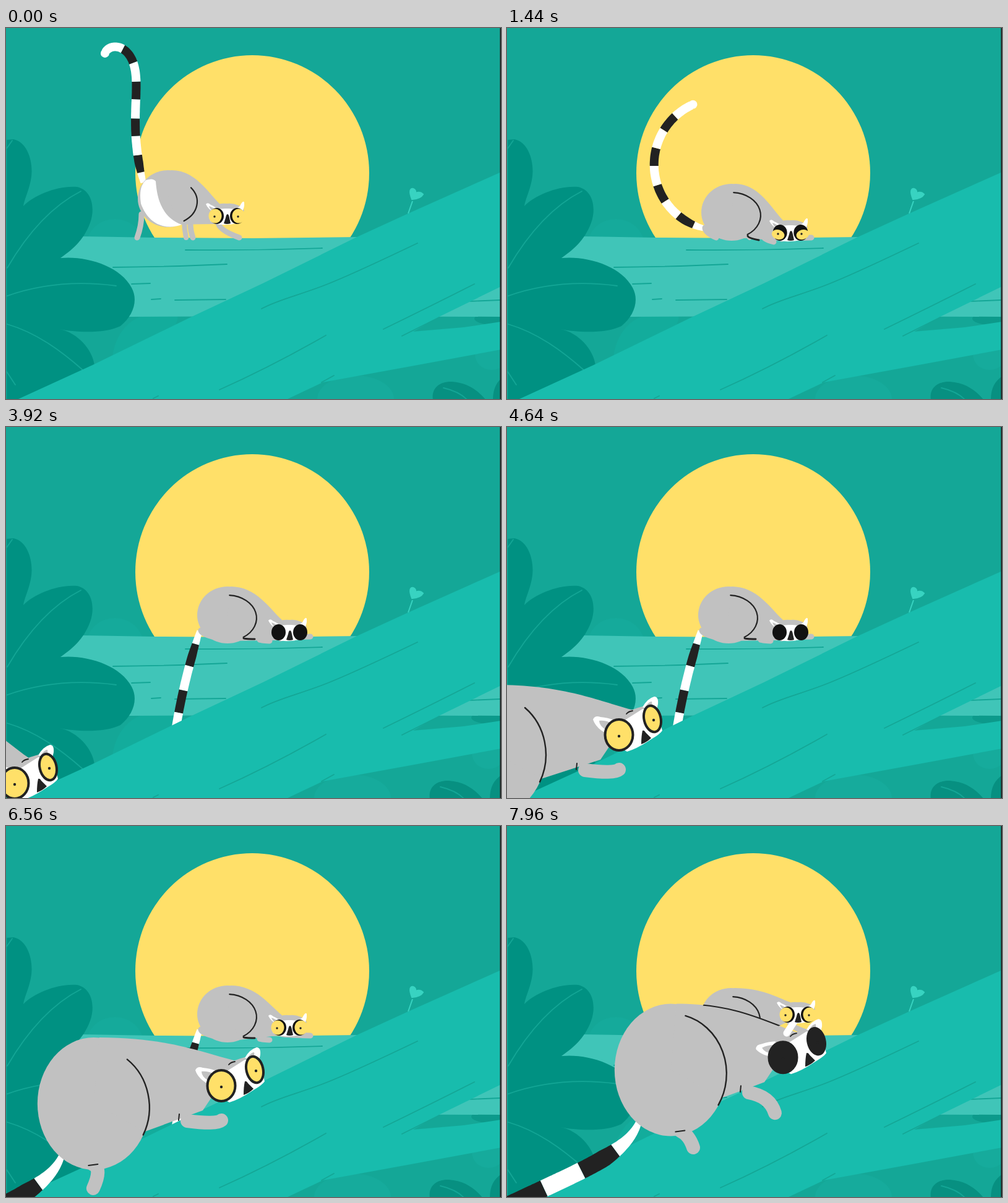
Write an HTML page that moves like this. It is 800 by 600 pixels and loops after 8 s.

```html
<!DOCTYPE html>
<html lang="en">
<head>
<meta charset="utf-8">
<title>Lemurs at sunset</title>
<style>
html, body { margin: 0; width: 100%; height: 100%; overflow: hidden; background: #14a797; }
svg { display: block; width: 100vw; height: 100vh; }
.line { fill: none; stroke: #14a696; stroke-width: 1.8; stroke-linecap: round; }
</style>
</head>
<body>
<svg viewBox="0 0 800 600" preserveAspectRatio="none">
  <rect width="800" height="600" fill="#14a797"/>
  <ellipse cx="176" cy="352" rx="46" ry="43" fill="#15aa9b"/>
  <path d="M172 530C178 492 202 466 232 464H278C276 484 268 496 250 510Z" fill="#13ac9c"/>
  <g id="brush">
    <ellipse cx="560" cy="600" rx="62" ry="38" fill="#16ab9c"/>
    <ellipse cx="780" cy="528" rx="27" ry="25" fill="#16ab9c"/>
    <ellipse cx="782" cy="470" rx="30" ry="10" fill="#0c9a8b"/>
    <path d="M685 602C682 582 696 571 716 572C740 574 756 584 771 602ZM782 602C782 580 790 568 806 560V602Z" fill="#079081"/>
    <path class="line" d="M702 582Q728 588 741 602"/>
  </g>
  <ellipse cx="398" cy="234.5" rx="189" ry="190.5" fill="#ffe069"/>
  <path d="M0 340L122 337L240 339L400 340L570 338L800 350V467L500 466L200 467H0Z" fill="#40c5b8"/>
  <path class="line" d="M290 359Q400 360 511 356M173 387Q270 386 357 382M203 414L233 413M235 439L250 438M273 440L355 439M750 442L798 440"/>
  <g id="far"></g>
  <path d="M650 300L657 280M656 277C651 264 653 259 658 260Q663 262 662 267Q669 264 674 269Q670 276 657 277Z" fill="#38d3c1" stroke="#38d3c1" stroke-width="2"/>
  <path d="M0 181L12 180C34 184 44 215 41 240C38 262 30 275 28 288C45 270 85 254 115 257C138 262 145 290 136 315C125 345 105 360 88 372C130 368 185 385 203 420C214 440 206 465 185 482C160 495 110 492 86 487C115 492 140 520 143 546L40 600H0Z" fill="#009182"/>
  <path class="line" d="M1 195L10 182M2 388C30 340 70 290 121 264M0 434C50 416 110 408 178 417M2 479C50 493 90 523 124 553M0 554L15 577M.5 180V600"/>
  <path d="M20 600L140 545L300 467L415 413L565 339L650 300L800 233V418L700 467L658 491L740 484L800 475V520L660 546L512 573L455 600Z" fill="#18bcad"/>
  <path class="line" d="M413 454C440 439 475 432 520 414S610 374 665 348M610 487Q690 448 757 414M640 498L700 468M345 585Q430 547 517 497M510 573L530 562M238 599L246 595"/>
  <g id="near"></g>
  <g id="top"></g>
  <rect x="798.3" width="2" height="600" fill="#222"/>
</svg>
<script>
const GREY = '#c1c1c1', INK = '#222', SUN = '#ffe069', WHITE = '#fff';
const RAD = Math.PI / 180;
const el = id => document.getElementById(id);
const clamp = k => Math.max(0, Math.min(1, k));
const add = (p, dx, dy) => [p[0] + dx, p[1] + dy];
const xy = p => p[0].toFixed(1) + ' ' + p[1].toFixed(1);

// Eased 0..1 ramp between two moments.
function ease(t, from, to) {
  const k = clamp((t - from) / (to - from));
  return k * k * (3 - 2 * k);
}

// ---- Drawing helpers ----
const fill = (d, c) => `<path d="${d}" fill="${c}"/>`;
const stroke = (d, c, w, more = '') =>
  `<path d="${d}" fill="none" stroke="${c}" stroke-width="${w}" stroke-linecap="round" stroke-linejoin="round" ${more}/>`;
const oval = (x, y, rx, ry, c, more = '') =>
  `<ellipse cx="${x}" cy="${y}" rx="${rx}" ry="${ry}" fill="${c}" ${more}/>`;
const place = (p, s) => `<g transform="translate(${xy(p)})">${s}</g>`;
const limb = (a, b, c, w) => stroke(`M${xy(a)}Q${xy(b)} ${xy(c)}`, GREY, w);
const onOval = ([x, y], rx, ry, deg) => [x + rx * Math.cos(deg * RAD), y + ry * Math.sin(deg * RAD)];
const arc = (p, rx, ry, from, to) =>
  `M${xy(onOval(p, rx, ry, from))}A${rx} ${ry} 0 0 1 ${xy(onOval(p, rx, ry, to))}`;

// Round rump with a back line to the neck and a belly line to the chest.
function torso(rump, rx, ry, neck, chest, bellyDeg) {
  const top = add(rump, rx * .1, -ry);
  const dx = neck[0] - top[0], dy = neck[1] - top[1];
  const back = `M${xy(top)}C${xy(add(top, dx / 2, 0))} ${xy(add(neck, -dx / 4, -dy * .35))} ${xy(neck)}`;
  const shape = oval(...rump, rx, ry, GREY) +
    fill(`${back}L${xy(chest)}L${xy(onOval(rump, rx, ry, bellyDeg))}L${xy(rump)}Z`, GREY);
  return { back, shape };
}

// Ringed tail that grows along a changing heading.
function tail([x, y], len, heading, bands, first, width) {
  const n = 90, left = [], right = [];
  for (let i = 0; i <= n; i++) {
    const a = heading(i / n) * RAD, w = width(i / n) / 2;
    const c = Math.cos(a), s = Math.sin(a);
    left.push([x - s * w, y + c * w]);
    right.push([x + s * w, y - c * w]);
    x += c * len / n;
    y += s * len / n;
  }
  const edge = i => i ? Math.round(n * (first + (1 - first) * (i - 1) / (bands - 1))) : 0;
  let out = oval(x, y, width(1) / 2, width(1) / 2, bands % 2 ? WHITE : INK);
  for (let i = 0; i < bands; i++) {
    const a = edge(i), b = edge(i + 1) + 1;
    const ring = left.slice(a, b).concat(right.slice(a, b).reverse());
    out += fill('M' + ring.map(xy).join('L') + 'Z', i % 2 ? INK : WHITE);
  }
  return out;
}

// ---- Small lemur: walks in, crouches, dozes, looks up ----
const GROUND = 339;

function farPose(t) {
  const low = ease(t, 1000, 1400), settle = ease(t, 1600, 2000);
  const wake = ease(t, 5800, 6300), rise = ease(t, 6900, 7700);
  const rump = [262 + 101 * clamp(t / 1300) - 5 * settle + 4 * rise, 276 + 22 * low + 6 * settle + 4 * rise];
  const head = add(rump, 95 + 5 * settle + 8 * rise, 28 + 5 * low - 5 * settle - 6 * wake - 25 * rise);
  const lid = .32 * (low - wake) + .68 * (ease(t, 2200, 2480) - ease(t, 4850, 5050));
  return { low, rise, rump, head, lid };
}

function farTail(t, { rump, low }) {
  const swing = ease(t, 1000, 1440), fall = ease(t, 1560, 2300);
  const start = -105 - 60 * swing - 87 * fall;
  const bend = 40 + 100 * swing - 158 * fall;
  const curl = -180 * (1 - ease(t, 0, 1000));
  return tail(add(rump, -40 - 5 * low, -26 + 52 * low), 255 + 5 * swing + 72 * fall,
    u => start + bend * u + curl * u ** 6, 9, .065, u => 9 + 5 * clamp(u * 8));
}

function drawFar(t) {
  const p = farPose(t), { rump, head, low } = p;
  const step = 8 * Math.sin(t / 1000 * 2 * Math.PI) * (1 - low);
  const leg = (hip, x, y, w) => limb(hip, [hip[0], (hip[1] + y) / 2], [x, y], w);
  const body = torso(rump, 49, 46, add(head, -12, -20), add(head, -19, 13), 65);
  const x = rump[0];
  el('far').innerHTML = farTail(t, p) +
    leg(add(rump, -43, 25), x - 50 + 25 * low + step, GROUND, 9) +
    leg(add(rump, 26, 35), x + 29 - step, GROUND, 8) +
    leg(add(rump, 36 + 16 * low, 40), x + 40 + 28 * low + step, GROUND + 7 * low, 9) +
    leg(add(head, -14, 10), head[0] + 20 + 14 * low - step, GROUND, 9) +
    `<clipPath id="farBody">${body.shape}</clipPath>` + body.shape +
    `<g transform="translate(${xy(add(rump, -46 * low, 0))}) scale(${1 - low})">` +
    fill('M-36-30Q-24-34-20-28C-18 0-10 30 22 42C0 50-30 46-44 8Q-48-20-36-30Z', WHITE) + '</g>' +
    stroke(arc(add(rump, 0, 5), 47, 37, -38 - 48 * low, 57), INK, 2.2) +
    leg(add(rump, 26, 38), x + 44, GROUND + 4 * low, 3).replace(GREY, low > .9 ? INK : 'none');
}

function smallHead(p, lid) {
  let s = fill('M-30-8Q-20-22 0-20Q18-22 28-9L22 5L-22 5Z', GREY) +
    fill('M-20-6Q-30-10-34-19Q-31-23-26-18Q-18-15-14-9Z M14-9Q17-14 21-16Q26-26 28-22Q29-12 23-5Z', WHITE) +
    fill('M-22-8Q-28-11-29-16Q-22-14-18-9Z', GREY) +
    fill('M-26-3Q-16-13 0-12Q14-13 25-5L25 6Q16 14 0 14Q-20 15-27 8Z', WHITE);
  for (const m of [-1, 1]) {
    const x = m * 19;
    s += oval(m * (16.5 + lid), 0, 11.5, 13, '#111') +
      oval(x, 10 * lid, 10.5, 11.5 * (1 - lid), SUN, `transform="rotate(${-m * 50 * lid} ${x} 0)"`);
    if (lid < .8) s += oval(x - 1, 1 + lid * 3, 1.7, 1.7, INK);
  }
  return place(p, s + fill('M1-3Q3-3 4 3L6 12Q0 14-5 12L-2 3Q-1-3 1-3Z', INK));
}

// ---- Big lemur: head reaches out, rump half follows, then catches up ----
const REACH = .61, PERIOD = 1650, FIRST = 2350;

function nearPose(t) {
  let head = -2, rump = -2, foot = -2;
  for (let i = 0; i < 4; i++) {
    const start = FIRST + i * PERIOD;
    const reach = ease(t, start, start + 600) * (i < 3 ? 1 : .587);
    const follow = ease(t, start + 850, start + 1430);
    head += reach;
    rump += REACH * reach + (1 - REACH) * follow;
    foot += follow;
  }
  return {
    stretch: head - rump,
    lean: ease(t, 7300, 7900),
    head: [181 + 167 * head, 498 - 78 * head],
    rump: [38 + 167 * rump, 495 - 74 * rump],
    foot: [136 + 165 * foot, 588 - 68 * foot]
  };
}

function drawNear(t) {
  const { head, rump, foot, stretch, lean } = nearPose(t);
  const chest = add(head, -30, 40), hand = add(head, -13 * lean, 56 + 34 * lean);
  const shoulder = add(chest, -25, 17), hip = [rump[0] * .57 + foot[0] * .43, rump[1] + 99];
  const body = torso(rump, 91, 107, add(head, 24, -40), chest, 25);
  el('near').innerHTML =
    tail(add(rump, -50, 78), 262, u => 155 - 50 * (1 - u) ** 5, 4, .25, u => 8 + 20 * clamp(u * 3)) +
    limb(hip, add(hip, 14, 6), foot, 22) +
    limb(shoulder, [hand[0] - 8, shoulder[1] + 6], hand, 22) +
    body.shape +
    stroke(body.back, INK, 2.2, 'clip-path="url(#farBody)"') +
    stroke(arc(add(rump, 0, 6), 90, 97, 145 * stretch - 108, 38 - 28 * stretch), INK, 2.4) +
    stroke(`M${xy(add(chest, -38, 6))}l-1 10M${xy(add(hip, -8, 1))}l15-2`, INK, 2) +
    bigHead(head, -24 * lean, t >= 7880);
}

function bigHead(p, ear, shut) {
  const eye = shut ? INK : SUN, rim = `stroke="${INK}" stroke-width="4"`;
  return place(p, fill('M-24-12Q5-38 38-46L56-30L30 0L0 0Z', GREY) +
    `<g transform="rotate(${ear.toFixed(1)} -15 -15)">` +
    fill('M-18-1Q-37-10-42-25Q-39-32-30-29Q-18-28-8-24Z', WHITE) +
    fill('M-21-8Q-32-15-32-23Q-22-24-12-19Z', GREY) + '</g>' +
    fill('M38-45Q46-59 57-62Q64-62 63-50L60-36Z', WHITE) +
    fill('M42-45Q48-54 53-54Q54-49 52-42Z', GREY) +
    fill('M8-23L38-42L62-38L70-7Q66-1 52 7Q30 22 13 27L0 20Z', WHITE) +
    oval(0, 0, 22.5, 25, eye, rim) +
    oval(54, -26, 13.5, 21.5, eye, rim + ' transform="rotate(-13 54 -26)"') +
    oval(0, 2, 2.2, 2.2, INK) + oval(56, -24, 2.2, 2.2, INK) +
    fill('M38-7Q41-8 43-4L52 5Q45 12 36 15Q36 2 38-7Z', INK) +
    stroke('M12-34Q15-38 22-39', INK, 1.8));
}

// The small head and its reaching hand stay in front.
function drawTop(t) {
  const { head, lid, rise } = farPose(t);
  const hand = add(head, -3 - 15 * rise, 7 + 23 * rise);
  el('top').innerHTML = stroke(`M${xy(add(head, -3, 7))}L${xy(hand)}`, WHITE, 11) + smallHead(head, lid);
}

function draw(t) {
  el('brush').setAttribute('transform', `translate(${5 * (1 - ease(t, 0, 1200))} 0)`);
  drawFar(t);
  drawNear(t);
  drawTop(t);
}

function frame() {
  draw(Math.floor(performance.now() % 8000 / 80) * 80);
  requestAnimationFrame(frame);
}
frame();
</script>
</body>
</html>
```
